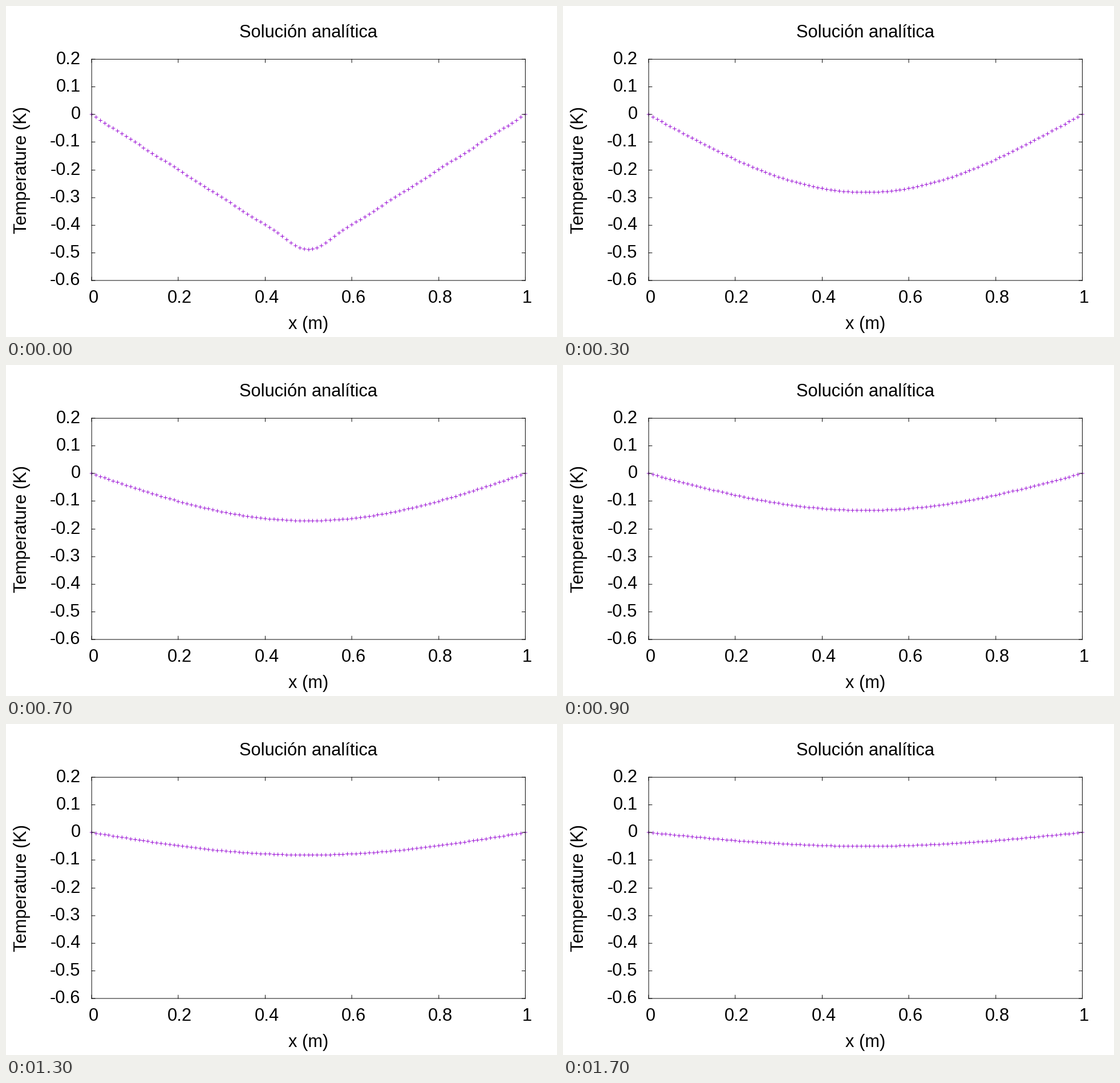
Write a matplotlib script that moves like this. It is 966 by 580 pixels and loops after 1800 ms.

```python
import numpy as np
import matplotlib.pyplot as plt
from matplotlib.animation import FuncAnimation
from matplotlib.collections import LineCollection

W, H, DPI = 966, 580, 64
GRID_W, GRID_H = 1000, 600    # drawing units, scaled down to the stage
LEFT, RIGHT, TOP, BOTTOM = 155, 942, 96, 497
Y_MIN, Y_MAX = -0.6, 0.2
FRAMES, INTERVAL = 18, 100
DIFFUSION_STEP = 0.0125       # diffusivity times the time between frames
MODES = np.arange(1, 18, 2)
ARM = 3                       # half length of a plus marker
TICK = 6
UNIT = W / GRID_W * 72 / DPI  # one drawing unit in points

plt.rcParams["font.family"] = "Liberation Sans"
fig = plt.figure(figsize=(W / DPI, H / DPI), dpi=DPI, facecolor="white")
ax = fig.add_axes([0, 0, 1, 1])
ax.set_xlim(0, GRID_W)
ax.set_ylim(GRID_H, 0)
ax.axis("off")


def column(x):
    return np.floor(LEFT + x * (RIGHT - LEFT) + 0.5)


def row(y):
    up = (y - Y_MIN) / (Y_MAX - Y_MIN) * (BOTTOM - TOP)
    return BOTTOM - np.floor(up + 0.5 - 1e-9)


def hline(x0, x1, y):
    return [(x0, y + 0.5), (x1 + 1, y + 0.5)]


def vline(x, y0, y1):
    return [(x + 0.5, y0), (x + 0.5, y1 + 1)]


def strokes(segments, color, zorder):
    lines = LineCollection(segments, colors=color, linewidths=UNIT,
                           capstyle="butt", zorder=zorder)
    lines.set_snap(False)
    return ax.add_collection(lines, autolim=False)


def label(x, y, text, ha="center", **kw):
    ax.text(x, y, text, ha=ha, va="baseline", fontsize=32 * UNIT,
            color="black", **kw)


def temperature(x, t):
    """Fourier solution of the heat equation for a triangular start."""
    n = MODES[:, None]
    sign = (-1.0) ** ((n - 1) // 2)
    terms = sign / n**2 * np.sin(n * np.pi * x) * np.exp(-(n * np.pi) ** 2 * t)
    return -4 / np.pi**2 * terms.sum(axis=0)


def draw_axes():
    segments = [hline(LEFT, RIGHT, TOP), hline(LEFT, RIGHT, BOTTOM),
                vline(LEFT, TOP, BOTTOM), vline(RIGHT, TOP, BOTTOM)]
    for k in range(6):
        c = column(k / 5)
        segments += [vline(c, TOP, TOP + TICK), vline(c, BOTTOM - TICK, BOTTOM)]
        label(c + 3.5, 538, f"{k / 5:g}")
    for k in range(-6, 3):
        r = row(k / 10)
        segments += [hline(LEFT, LEFT + TICK, r), hline(RIGHT - TICK, RIGHT, r)]
        label(135.2, r + 9, f"{k / 10:g}", ha="right")
    strokes(segments, "black", 3)
    label(548.5, 57, "Solución analítica")
    label(548.5, 585.5, "x (m)")
    label(37.3, 297, "Temperature (K)", rotation=90, rotation_mode="anchor")


def plus_markers(i):
    x = np.linspace(0, 1, 101)
    points = zip(column(x), row(temperature(x, i * DIFFUSION_STEP)))
    return [seg for c, r in points
            for seg in (hline(c - ARM, c + ARM, r), vline(c, r - ARM, r + ARM))]


draw_axes()
markers = strokes(plus_markers(0), "#9400d3", 2)


def update(i):
    markers.set_segments(plus_markers(i))
    return [markers]


anim = FuncAnimation(fig, update, frames=FRAMES, interval=INTERVAL,
                     repeat=True, repeat_delay=0)
plt.show()
```
